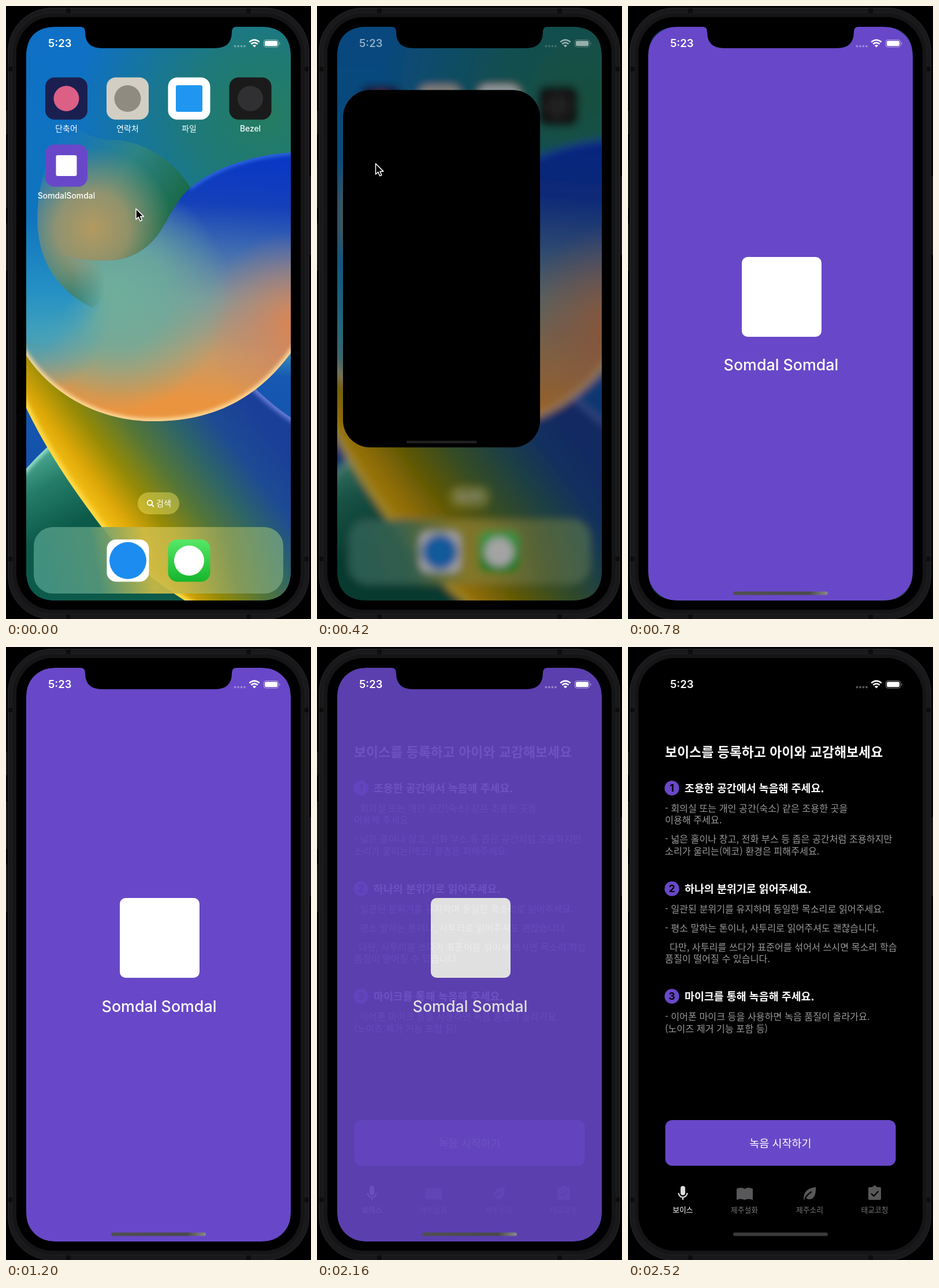
An HTML page for the animation above (2.58 s loop, 528 px wide and 1060 px high).

```html
<!DOCTYPE html>
<html lang="ko">
<head>
<meta charset="utf-8">
<title>App launch</title>
<style>
  html, body { margin: 0; width: 100%; height: 100%; overflow: hidden; background: #000; }
  svg { display: block; width: 100vw; height: 100vh; }
  text { font-family: Inter, "Noto Sans CJK KR", "Noto Sans CJK", sans-serif; fill: #fff; }
  .ko { font-family: "Noto Sans CJK KR", "Noto Sans CJK", sans-serif; }
  .mid { text-anchor: middle; }
</style>
</head>
<body>
<svg viewBox="0 0 528 1060">
  <defs>
    <clipPath id="screen">
      <path d="M87 36H129Q137 36 137 45Q137 73 166 73H362Q391 73 391 45Q391 36 399 36H441C476 36 493 54 493 88V976C493 1010 476 1028 441 1028H87C52 1028 35 1010 35 976V88C35 54 52 36 87 36Z"/>
    </clipPath>
    <clipPath id="windowClip"><rect id="windowRect"/></clipPath>
    <clipPath id="sphereClip"><use href="#sphere"/></clipPath>
    <clipPath id="leafClip"><use href="#leaf"/></clipPath>
    <clipPath id="hillClip"><use href="#hill"/></clipPath>
    <path id="petal" d="M110 205C72 250 50 320 55 385C60 450 95 495 150 522L240 440L320 316C295 270 240 234 190 232C150 232 130 215 110 205Z"/>
    <path id="sphere" d="M510 252C440 256 370 272 318 315C296 335 282 365 270 385C252 415 220 440 178 440C145 441 120 437 100 432C60 440 20 440 20 500V578C60 660 150 718 255 718C370 718 450 670 510 575Z"/>
    <path id="leaf" d="M20 580V662C60 755 112 830 165 900C215 960 260 1000 330 1040L510 1045V722C480 705 450 680 425 655L300 640Z"/>
    <path id="hill" d="M20 818Q46 785 78 757L200 900L345 1045H20Z"/>
    <filter id="soft" x="-20%" y="-20%" width="140%" height="140%"><feGaussianBlur stdDeviation="3.5"/></filter>
    <filter id="blur" filterUnits="userSpaceOnUse" x="0" y="0" width="528" height="1060"><feGaussianBlur id="blurAmount" stdDeviation="0"/></filter>

    <linearGradient id="sky" gradientUnits="userSpaceOnUse" x1="0" y1="36" x2="0" y2="1028">
      <stop offset="0" stop-color="#0f70c6"/><stop offset=".33" stop-color="#0f74be"/>
      <stop offset=".46" stop-color="#2590c4"/><stop offset=".55" stop-color="#45a4ba"/>
      <stop offset=".61" stop-color="#1658b2"/><stop offset="1" stop-color="#1048a0"/>
    </linearGradient>
    <radialGradient id="teal" gradientUnits="userSpaceOnUse" cx="450" cy="190" r="330">
      <stop offset="0" stop-color="#257c60"/><stop offset=".4" stop-color="#1f7a72" stop-opacity=".9"/>
      <stop offset="1" stop-color="#1f7a72" stop-opacity="0"/>
    </radialGradient>
    <linearGradient id="petalBase" gradientUnits="userSpaceOnUse" x1="100" y1="240" x2="290" y2="360">
      <stop offset="0" stop-color="#1474c0"/><stop offset=".5" stop-color="#2d8484"/><stop offset="1" stop-color="#1a6a48"/>
    </linearGradient>
    <radialGradient id="petalGold" gradientUnits="userSpaceOnUse" cx="150" cy="385" r="140">
      <stop offset="0" stop-color="#b39a60"/><stop offset=".45" stop-color="#a3966a" stop-opacity=".85"/>
      <stop offset="1" stop-color="#8a9670" stop-opacity="0"/>
    </radialGradient>
    <radialGradient id="sphereFade" gradientUnits="userSpaceOnUse" cx="60" cy="480" r="112">
      <stop offset=".48" stop-color="#000"/><stop offset="1" stop-color="#fff"/>
    </radialGradient>
    <mask id="sphereMask" maskUnits="userSpaceOnUse" x="0" y="0" width="528" height="1060">
      <rect width="528" height="1060" fill="url(#sphereFade)"/>
    </mask>
    <linearGradient id="sphereBase" gradientUnits="userSpaceOnUse" x1="350" y1="262" x2="320" y2="718">
      <stop offset="0" stop-color="#0a38c4"/><stop offset=".17" stop-color="#1440ba"/>
      <stop offset=".36" stop-color="#4470b0"/><stop offset=".54" stop-color="#84989a"/>
      <stop offset=".74" stop-color="#c89a66"/><stop offset=".92" stop-color="#ea9440"/>
    </linearGradient>
    <radialGradient id="sphereMint" gradientUnits="userSpaceOnUse" cx="190" cy="500" r="200">
      <stop offset="0" stop-color="#6fae9a"/><stop offset=".45" stop-color="#6cab9c" stop-opacity=".85"/>
      <stop offset="1" stop-color="#6cab9c" stop-opacity="0"/>
    </radialGradient>
    <radialGradient id="sphereCyan" gradientUnits="userSpaceOnUse" cx="40" cy="535" r="140">
      <stop offset="0" stop-color="#3a9ec0"/><stop offset=".4" stop-color="#3f9fbc" stop-opacity=".85"/>
      <stop offset="1" stop-color="#3fa2c0" stop-opacity="0"/>
    </radialGradient>
    <radialGradient id="sphereRose" gradientUnits="userSpaceOnUse" cx="500" cy="550" r="160">
      <stop offset="0" stop-color="#dd8450"/><stop offset="1" stop-color="#c8806a" stop-opacity="0"/>
    </radialGradient>
    <linearGradient id="leafFill" gradientUnits="userSpaceOnUse" x1="110" y1="820" x2="370" y2="620">
      <stop offset="0" stop-color="#f6c018"/><stop offset=".1" stop-color="#dea808"/>
      <stop offset=".25" stop-color="#958a06"/><stop offset=".43" stop-color="#547638"/>
      <stop offset=".62" stop-color="#2d6468"/><stop offset=".8" stop-color="#1d4a94"/>
      <stop offset="1" stop-color="#1a3f98"/>
    </linearGradient>
    <linearGradient id="hillFill" gradientUnits="userSpaceOnUse" x1="50" y1="780" x2="110" y2="900">
      <stop offset="0" stop-color="#4aa68e"/><stop offset=".4" stop-color="#247c68"/><stop offset="1" stop-color="#0c5a4a"/>
    </linearGradient>
    <linearGradient id="dockFill" gradientUnits="userSpaceOnUse" x1="60" y1="1000" x2="470" y2="920">
      <stop offset="0" stop-color="#459484"/><stop offset=".24" stop-color="#55967a"/>
      <stop offset=".46" stop-color="#cdbb45"/><stop offset=".58" stop-color="#c3b748"/>
      <stop offset=".8" stop-color="#869c5a"/><stop offset="1" stop-color="#6a9a7c"/>
    </linearGradient>
    <linearGradient id="green" x2="0" y2="1"><stop stop-color="#56e868"/><stop offset="1" stop-color="#14b52c"/></linearGradient>
    <linearGradient id="barShade"><stop stop-color="#505052"/><stop offset=".8" stop-color="#4a4a4c"/><stop offset="1" stop-color="#8a8a8c"/></linearGradient>

    <g id="status">
      <text x="73" y="71.3" font-size="18.5" font-weight="600">5:23</text>
      <g fill="#fff">
        <g opacity=".35"><circle cx="396.5" cy="69.5" r="1.9"/><circle cx="402" cy="69.5" r="1.9"/><circle cx="407.5" cy="69.5" r="1.9"/><circle cx="413" cy="69.5" r="1.9"/></g>
        <path d="M430 71.5L426.8 68.2Q430 65.7 433.2 68.2Z"/>
        <path d="M424.3 65.8Q430 61 435.7 65.8M421.3 62.2Q430 55.2 438.7 62.2" fill="none" stroke="#fff" stroke-width="2.6"/>
        <rect x="446.2" y="58.5" width="25.6" height="12.6" rx="3.8" fill="none" stroke="#fff" stroke-opacity=".5"/>
        <rect x="448" y="60.3" width="22" height="9" rx="2.3"/>
        <path d="M473.3 62.5Q476 64.8 473.3 67Z" opacity=".5"/>
      </g>
    </g>
  </defs>

  <rect width="528" height="1060"/>
  <g id="phone">
    <g fill="#1c1c1f">
      <path d="M0 181h2v41H0zM0 267h2v82H0zM0 376h2v82H0zM526 294h2v137H526z"/>
      <rect x="3.5" y="3.5" width="521" height="1057" rx="76" fill="#19181a" stroke="#29282b"/>
      <rect x="10.5" y="11.5" width="507" height="1040" rx="70" fill="#151416" stroke="#201f22"/>
      <path d="M104 4h8v8h-8zM416 4h8v8h-8zM104 1052h8v8h-8zM416 1052h8v8h-8zM4 105h7v8H4zM517 105h7v8h-7zM4 952h7v8H4zM517 952h7v8h-7z" fill="#0d0c0e"/>
    </g>
    <rect x="18" y="19" width="492" height="1025" rx="63"/>
  </g>

  <g clip-path="url(#screen)">
    <g id="home">
      <g id="homeBlur">
        <g id="wallpaper">
          <rect x="15" y="16" width="498" height="1032" fill="url(#sky)"/>
          <rect x="15" y="16" width="498" height="560" fill="url(#teal)"/>
          <use href="#petal" fill="url(#petalBase)"/>
          <use href="#petal" fill="url(#petalGold)"/>
          <use href="#hill" fill="url(#hillFill)"/>
          <g clip-path="url(#hillClip)">
            <path d="M20 818Q46 785 78 757" fill="none" stroke="#9fe4d0" stroke-width="9" filter="url(#soft)"/>
          </g>
          <use href="#leaf" fill="url(#leafFill)"/>
          <g clip-path="url(#leafClip)" fill="none" filter="url(#soft)">
            <path d="M20 662C60 755 112 830 165 900C215 960 260 1000 330 1040" stroke="#ffdc48" stroke-width="12"/>
            <path d="M425 655C450 680 480 705 510 722" stroke="#647cd8" stroke-width="12"/>
          </g>
          <g mask="url(#sphereMask)">
            <use href="#sphere" fill="url(#sphereBase)"/>
            <use href="#sphere" fill="url(#sphereRose)"/>
            <use href="#sphere" fill="url(#sphereMint)"/>
            <use href="#sphere" fill="url(#sphereCyan)"/>
          </g>
          <g clip-path="url(#sphereClip)" fill="none">
            <path d="M20 578C60 660 150 718 255 718C370 718 450 670 510 575" stroke="#ffe0a0" stroke-width="9" filter="url(#soft)"/>
            <path d="M510 252C440 256 370 272 318 315" stroke="#3a78e8" stroke-width="6" filter="url(#soft)"/>
          </g>
        </g>
        <g id="icons">
          <rect x="228" y="841" width="72" height="38" rx="19" fill="#fff06a" fill-opacity=".4"/>
          <g fill="none" stroke="#fff" stroke-width="2"><circle cx="249" cy="859" r="4.2"/><path d="M252 862L256 866"/></g>
          <text class="ko" x="260" y="865" font-size="14" font-weight="500">검색</text>
          <rect x="48" y="901" width="432" height="115" rx="33" fill="url(#dockFill)" fill-opacity=".92"/>
          <g id="labels"></g>
        </g>
      </g>
      <rect id="dim" x="15" y="16" width="498" height="1032" opacity="0"/>
      <use id="homeStatus" href="#status"/>
    </g>

    <g id="app" clip-path="url(#windowClip)">
      <rect width="528" height="1060"/>
      <rect id="iconTint" width="528" height="1060" fill="#6848c8"/>
      <g id="content">
        <g id="main"></g>
        <g id="splash">
          <rect width="528" height="1060" fill="#6848c8"/>
          <rect x="197" y="434" width="138" height="138" rx="10" fill="#fff"/>
          <text class="mid" x="265" y="630.5" font-size="26.8" font-weight="500">Somdal Somdal</text>
        </g>
        <use id="appStatus" href="#status"/>
      </g>
      <rect id="homeBar"/>
    </g>
  </g>
  <path id="cursor" d="M0 0V18.5L4.3 14.6L7.2 21.3L10.4 20L7.6 13.4H13.4Z" stroke="#fff" stroke-width="1.5" stroke-linejoin="round"/>
</svg>

<script>
const LOOP = 2580, STEP = 60, PURPLE = '#6848c8';
const $ = id => document.getElementById(id);
const clamp = v => Math.max(0, Math.min(1, v));
const mix = (a, b, k) => a + (b - a) * k;

function add(parent, tag, attrs, text = '') {
  const node = document.createElementNS('http://www.w3.org/2000/svg', tag);
  set(node, attrs);
  node.textContent = text;
  parent.appendChild(node);
  return node;
}
function set(node, attrs) {
  for (const key in attrs) node.setAttribute(key, attrs[key]);
}

// Home screen tiles, each with one plain mark
function tile(cx, cy, fill, shape, size, color, label) {
  const icons = $('icons');
  const box = { x: cx - 36.5, y: cy - 36.5, width: 73, height: 73, rx: 16 };
  add(icons, 'rect', { ...box, fill });
  if (shape === 'circle') add(icons, 'circle', { cx, cy, r: size, fill: color });
  else add(icons, 'rect', { x: cx - size, y: cy - size, width: 2 * size, height: 2 * size, rx: 3, fill: color });
  if (label) add($('labels'), 'text', { class: 'mid', x: cx, y: cy + 56.5, 'font-size': 13.9, 'font-weight': 500 }, label);
  return box;
}
tile(104.5, 160, '#1a1f50', 'circle', 22, '#dc5f86', '단축어');
tile(210.5, 160, '#d3cec3', 'circle', 23, '#8f8b81', '연락처');
tile(317, 160, '#fff', 'square', 23, '#1f97f0', '파일');
tile(423, 160, '#1a1a1b', 'circle', 22, '#303032', 'Bezel');
const launcher = tile(104.5, 276, PURPLE, 'square', 18, '#fff', 'SomdalSomdal');
const press = add($('icons'), 'rect', { ...launcher, opacity: 0 });
tile(211, 959, '#fff', 'circle', 32, '#1c8cf0');
tile(317, 959, 'url(#green)', 'circle', 26, '#fff');

// Recording guide
const main = $('main');
const write = (x, y, size, weight, fill, text, cls = 'ko') =>
  add(main, 'text', { class: cls, x, y, 'font-size': size, 'font-weight': weight, style: `fill:${fill}` }, text);
write(64, 190, 22.9, 700, '#fff', '보이스를 등록하고 아이와 교감해보세요');
[
  [244, '조용한 공간에서 녹음해 주세요.'],
  [418, '하나의 분위기로 읽어주세요.'],
  [604, '마이크를 통해 녹음해 주세요.']
].forEach(([y, text], i) => {
  add(main, 'circle', { cx: 76, cy: y, r: 12.7, fill: PURPLE });
  write(76, y + 6.2, 17.5, 700, '#000', i + 1, 'mid');
  write(98, y + 6.5, 18.4, 700, '#fff', text);
});
[
  [64, 285, '- 회의실 또는 개인 공간(숙소) 같은 조용한 곳을'],
  [64, 305, '이용해 주세요.'],
  [64, 338, '- 넓은 홀이나 창고, 전화 부스 등 좁은 공간처럼 조용하지만'],
  [64, 359, '소리가 울리는(에코) 환경은 피해주세요.'],
  [64, 459, '- 일관된 분위기를 유지하며 동일한 목소리로 읽어주세요.'],
  [64, 492, '- 평소 말하는 톤이나, 사투리로 읽어주셔도 괜찮습니다.'],
  [72, 525, '다만, 사투리를 쓰다가 표준어를 섞어서 쓰시면 목소리 학습'],
  [64, 545, '품질이 떨어질 수 있습니다.'],
  [64, 645, '- 이어폰 마이크 등을 사용하면 녹음 품질이 올라가요.'],
  [64, 666, '(노이즈 제거 기능 포함 등)']
].forEach(([x, y, text]) => write(x, y, 16.2, 400, '#999', text));

add(main, 'rect', { x: 64.5, y: 818, width: 399, height: 79, rx: 12, fill: PURPLE });
write(264, 864.5, 18.5, 500, '#fff', '녹음 시작하기', 'ko mid');
[[95, '보이스'], [201.5, '제주설화'], [314.5, '제주소리'], [427, '태교코칭']].forEach(([x, text], i) =>
  write(x, 978, 12.8, 400, i ? '#777' : '#fff', text, 'ko mid'));

const glyph = (d, fill, stroke = 'none') =>
  add(main, 'path', { d, fill, stroke, 'stroke-width': 2.2 });
glyph('M91 936a4 4 0 0 1 8 0v8a4 4 0 0 1-8 0z', '#ddd');
glyph('M87.5 944a7.5 7.5 0 0 0 15 0M95 951.5V956', 'none', '#ddd');
glyph('M188 937Q195 933 202 937Q209 933 216 937V956Q209 953 202 956Q195 953 188 956Z', '#58585a');
glyph('M325 934C326 950 320 956 312 955L308 953L306 956L304 955C304 944 309 936 325 934Z', '#58585a');
glyph('M306 955Q310 946 318 942', 'none', '#000');
glyph('M418 934H423Q427 928 431 934H436Q438 934 438 936V954Q438 956 436 956H418Q416 956 416 954V936Q416 934 418 934Z', '#58585a');
glyph('M421 945L425.5 949.5L433.5 941', 'none', '#000');

// Critically damped spring for the opening window
function spring(ms) {
  const k = Math.max(0, ms) * 0.0255;
  return 1 - (1 + k) * Math.exp(-k);
}
const about = (x, y, s) => `translate(${x} ${y}) scale(${s}) translate(-264 -532)`;

function render(t) {
  const open = t < 960 ? spring(t - 325) : 1;
  const show = clamp((t - 430) / 220);
  const reveal = clamp((t - 2130) / 250);

  const move = clamp(t / 180), eased = move * move * (3 - 2 * move);
  set($('cursor'), {
    transform: `translate(${mix(225, 101.5, eased)} ${mix(350.5, 272.5, eased)})`,
    visibility: t < 540 ? 'visible' : 'hidden'
  });
  set(press, { opacity: t >= 240 ? 0.35 : 0 });

  set($('home'), { visibility: open < 1 ? 'visible' : 'hidden' });
  if (open > 0) $('homeBlur').setAttribute('filter', 'url(#blur)');
  else $('homeBlur').removeAttribute('filter');
  set($('blurAmount'), { stdDeviation: 10 * open });
  set($('wallpaper'), { transform: about(264, 532, 1 + 0.13 * open) });
  set($('icons'), { transform: about(264, 532, 1 - 0.05 * open) });
  set($('labels'), { opacity: clamp(1 - 1.5 * open) });
  set($('dim'), { opacity: 0.52 * open });
  set($('homeStatus'), { opacity: 1 - 0.65 * open });

  const w = mix(73, 458, open), h = w * mix(1, 992 / 458, open);
  const cx = mix(104.5, 264, open), cy = mix(276, 532, open), s = w / 458;
  set($('app'), { visibility: open > 0 ? 'visible' : 'hidden' });
  set($('windowRect'), {
    x: cx - w / 2, y: cy - h / 2, width: w, height: h,
    rx: mix(16, 48, clamp(open * 1.4))
  });
  set($('content'), { transform: about(cx, cy, s) });
  set($('iconTint'), { opacity: clamp(1 - open / 0.5) });
  set(main, { opacity: clamp((t - 2040) / 200) });
  set($('splash'), { opacity: show * (1 - reveal) });
  set($('appStatus'), { opacity: clamp(show * 1.5) });

  const barFill = t < 480 ? '#202020' : t < 780 ? '#b8b8b8' : reveal < 1 ? 'url(#barShade)' : '#3a3a3c';
  set($('homeBar'), {
    x: cx - 82 * s, y: cy + h / 2 - 15.5 * s,
    width: 164 * s, height: 6 * s, rx: 3 * s, fill: barFill
  });
}

const start = performance.now();
function frame() {
  const t = (performance.now() - start) % LOOP;
  render(Math.floor(t / STEP) * STEP);
  requestAnimationFrame(frame);
}
frame();
</script>
</body>
</html>
```
